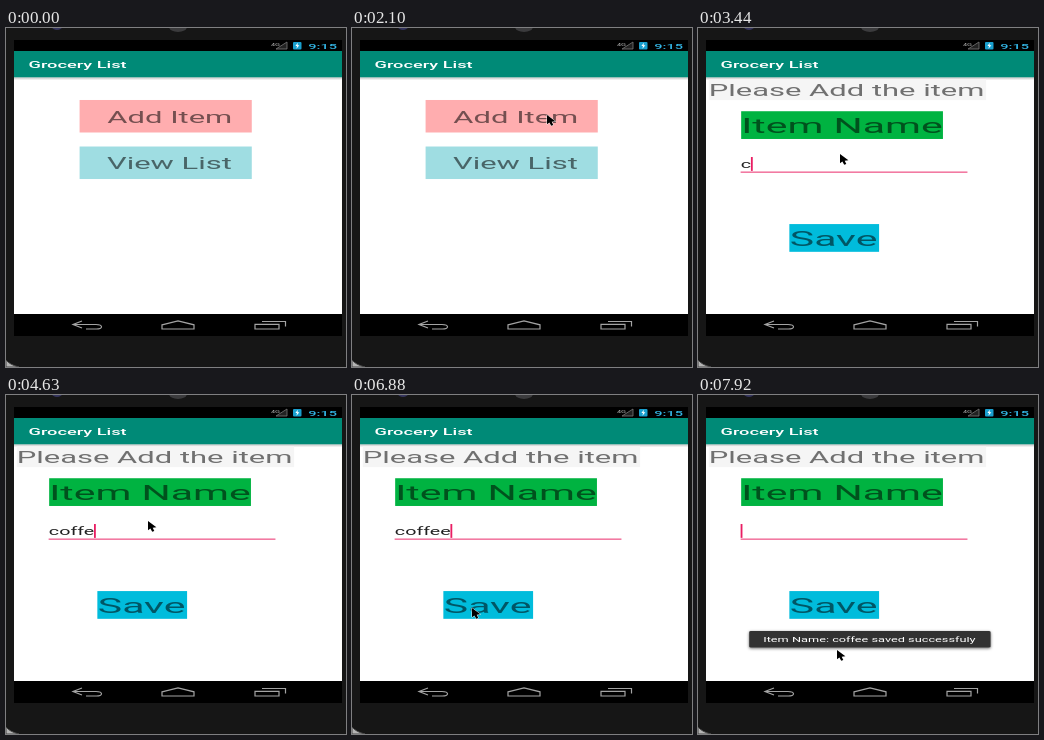
These frames come from a looping animation (340 px wide and 339 px high, 8000 ms). An HTML page:

```html
<!DOCTYPE html>
<html lang="en">
<head>
<meta charset="utf-8">
<title>Grocery List</title>
<style>
  html, body { margin: 0; width: 100%; height: 100%; overflow: hidden; background: #161616; }
  svg { display: block; width: 340px; height: 339px; }
  text { font-family: Roboto, sans-serif; white-space: pre; }
  .d1 { font-size: 34px; fill: #0000008a; }
  .d2 { font-size: 45px; fill: #0000008a; }
  .icon { fill: none; stroke: #a4a4a4; stroke-width: 1.2; }
</style>
</head>
<body>
<svg viewBox="0 0 340 339">
  <defs>
    <linearGradient id="shade" x2="0" y2="1">
      <stop stop-color="#000" stop-opacity=".24"/>
      <stop offset="1" stop-color="#000" stop-opacity="0"/>
    </linearGradient>
    <filter id="drop" x="-10%" y="-50%" width="120%" height="220%">
      <feDropShadow dx="0" dy="2" stdDeviation="2 3" flood-opacity=".6"/>
    </filter>
  </defs>

  <!-- device -->
  <rect width="340" height="339" fill="#161616"/>
  <path d="M0 332Q4 337 13 339H0Z" fill="#b5b5b5" stroke="#444"/>
  <ellipse cx="172" cy="-1" rx="9" ry="5" fill="#3b3b3d"/>
  <ellipse cx="51" cy="-1" rx="5" ry="3" fill="#34345c"/>
  <rect x="8" y="12" width="328" height="296"/>
  <rect x="8" y="49" width="328" height="237" fill="#fff"/>
  <rect x="8" y="49.3" width="328" height="3" fill="url(#shade)"/>
  <rect x="8" y="23" width="328" height="26.3" fill="#008a77"/>

  <!-- status and navigation icons -->
  <path d="M270 21H281V14Z" fill="#222" stroke="#777" stroke-width=".8"/>
  <rect x="287" y="14" width="8.5" height="7.5" rx="1" fill="#199fce"/>
  <path d="M291.8 14.8L289.4 18H291L290.4 20.8 293.4 17.3H291.6Z" fill="#fff"/>
  <g class="icon">
    <path d="M76 293L67 296.5 76 300M67 296.5H90Q95.5 296.5 95.5 298.8T90 301H80"/>
    <path d="M156 296.8L172 292.8 188 296.8V301H156Z"/>
    <path d="M249 296.3H273V301H249ZM256 293.5H279.5V298.5"/>
  </g>

  <!-- the screen is 360 x 640 units, squashed to the device -->
  <g transform="translate(8 12) scale(.911 .4625)">
    <text x="282" y="13" font-size="8" fill="#bbb">4G</text>
    <text x="323" y="20" font-size="16" font-weight="500" fill="#33b5e5">9:15</text>
    <text x="16" y="61" font-size="20" font-weight="500" fill="#fff">Grocery List</text>

    <g id="home">
      <rect x="72" y="129.7" width="189" height="70.3" fill="#ffadaf"/>
      <text class="d1" x="102.5" y="179.5">Add Item</text>
      <rect x="72" y="230.3" width="189" height="70.3" fill="#9fdde2"/>
      <text class="d1" x="102" y="279">View List</text>
    </g>

    <g id="form">
      <rect x="3" y="85" width="304.5" height="45" fill="#f5f5f5"/>
      <text class="d1" x="3" y="121">Please Add the item</text>
      <rect x="38.6" y="154" width="221.5" height="60" fill="#00b341"/>
      <text class="d2" x="38.6" y="201.5">Item Name</text>
      <text id="field" x="38.3" y="277" font-size="21.6" fill="#000000de"></text>
      <rect id="caret" y="253" width="2" height="30" fill="#e91e63"/>
      <rect x="38" y="284.5" width="249" height="2.4" fill="#ec407a"/>
      <rect x="91.5" y="398" width="98.5" height="60" fill="#00bcdc"/>
      <text class="d2" x="92" y="445.5">Save</text>
      <g id="toast">
        <rect x="47.4" y="484.5" width="265" height="35.5" rx="2" fill="#323232" filter="url(#drop)"/>
        <text x="62.8" y="508" font-size="14" fill="#fff">Item Name: coffee saved successfuly</text>
      </g>
    </g>
  </g>

  <path id="pointer" d="M0 0V9.3L2.4 7.4 4.2 10.8 6.3 10 4.7 6.7 8.4 6.3Z" stroke="#fff" stroke-width=".9" paint-order="stroke"/>
</svg>
<script>
const $ = id => document.getElementById(id);
const LOOP = 8000, STEP = 150;

// start time, end x, end y, number of steps
const moves = [
  [1350, 268, 243, 1], [1500, 195, 87, 5], [2690, 142, 126, 2],
  [5380, 142, 132, 1], [5530, 144, 133, 1], [6130, 120, 213, 6], [7320, 139, 255, 5]
];
const typing = [
  [0, ''], [3440, 'c'], [3730, 'co'], [4030, 'coff'], [4630, 'coffe'],
  [4780, 'coffee'], [4930, 'coffeee'], [5830, 'coffee'], [7170, '']
];

const show = (id, on) => $(id).setAttribute('visibility', on ? 'visible' : 'hidden');

function pointerAt(t) {
  let x = moves[0][1], y = moves[0][2];
  for (const [start, endX, endY, steps] of moves) {
    if (t < start) break;
    const p = Math.min(1, (Math.floor((t - start) / STEP) + 1) / steps);
    x += (endX - x) * p;
    y += (endY - y) * p;
  }
  return [x, y];
}

function draw(now) {
  const t = now % LOOP;
  const home = t < 2400;
  $('home').style.display = home ? '' : 'none';
  $('form').style.display = home ? 'none' : '';

  const field = $('field');
  field.textContent = typing.findLast(([start]) => t >= start)[1];
  const width = field.textContent ? field.getComputedTextLength() : 0;
  $('caret').setAttribute('x', 38 + width);
  show('caret', t < 5380 || t >= 5830);

  $('toast').setAttribute('opacity', t < 7170 ? 0 : t < 7320 ? 0.64 : 1);

  show('pointer', t >= moves[0][0]);
  $('pointer').setAttribute('transform', `translate(${pointerAt(t)})`);
  requestAnimationFrame(draw);
}
draw(performance.now());
</script>
</body>
</html>
```
